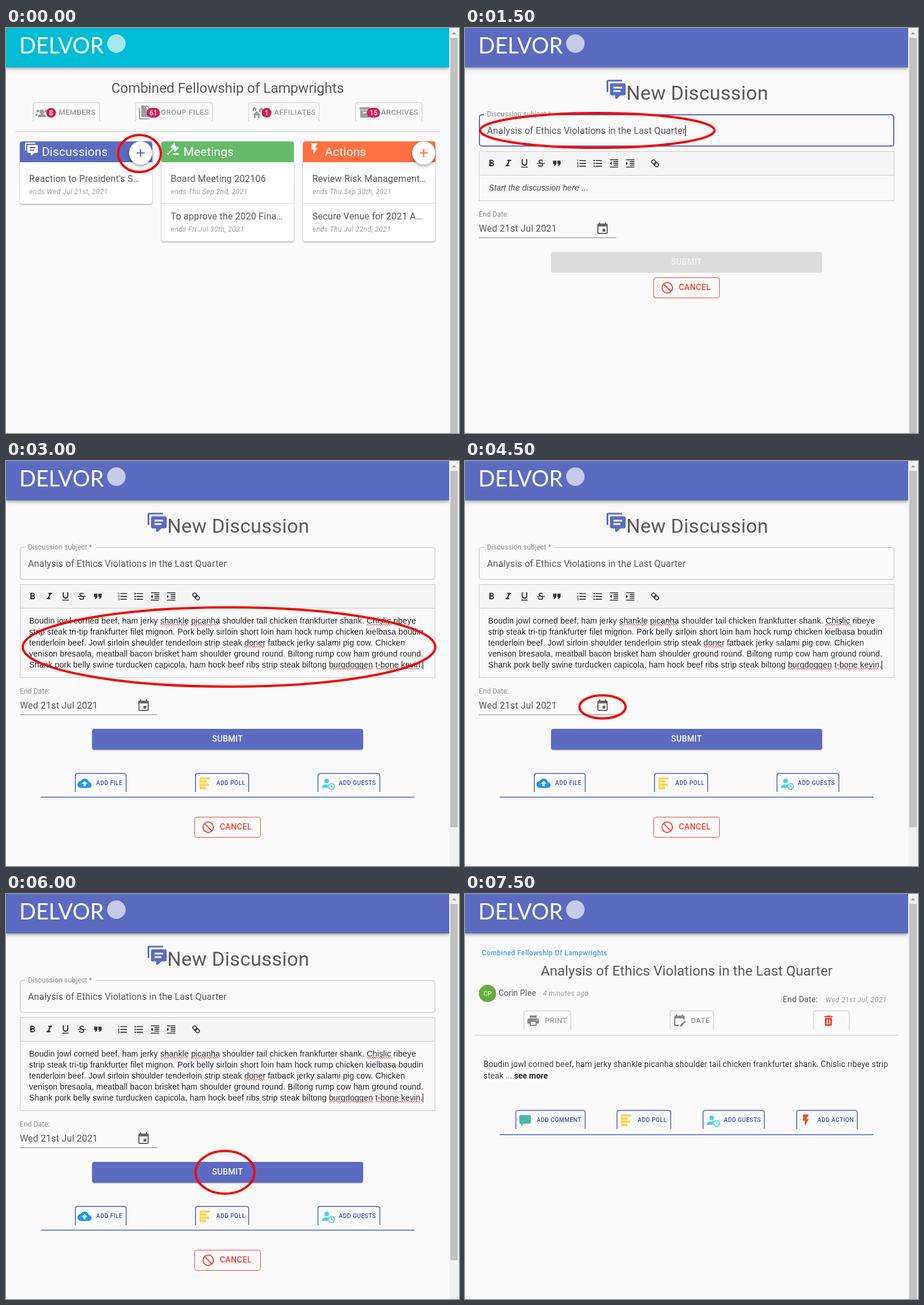
Write an HTML page that moves like this. It is 784 px wide and 700 px high and loops after 8 s.

```html
<!DOCTYPE html>
<html lang="en">
<head>
<meta charset="utf-8">
<title>Starting a discussion</title>
<style>
  html, body { margin: 0; width: 100%; height: 100%; overflow: hidden; background: #fafafa; }
  svg { display: block; width: 784px; height: 700px; font-family: Roboto, sans-serif; }
  .bar { filter: drop-shadow(0 2px 2px #0004) drop-shadow(0 1px 4px #0003); }
  .card { filter: drop-shadow(0 1px 1px #0006); }
  .fab { filter: drop-shadow(0 3px 3px #0005); }
  .button { filter: drop-shadow(0 1px 1px #0005); }
  .body { font-family: "Liberation Sans", Arial, sans-serif; }
  .italic { font-style: italic; }
  .medium { font-weight: 500; }
  .bold { font-weight: 700; }
  .middle { text-anchor: middle; }
</style>
</head>
<body>
<svg id="stage" viewBox="0 0 784 700"></svg>
<script>
const INDIGO = '#5c6bc0', GREEN = '#66bb6a', ORANGE = '#ff7043', RED = '#f44336';
const GREY = '#9e9e9e', PALE = '#e0e0e0', INK = '#5a5a5a', EDGE = '#7986cb', PAGE = '#fafafa';
const SUBJECT = 'Analysis of Ethics Violations in the Last Quarter';

const ICONS = {
  group: 'M8 11a3.300 3.300 0 1 1 8 0a4 4 0 0 1-8 0zM12 15c-4 0-7 1.500-7 3.500V20h14v-1.500c0-2-3-3.500-7-3.500zM2.500 9.500a2.500 2.500 0 1 1 5 0a2.500 2.500 0 0 1-5 0zM16.500 9.500a2.500 2.500 0 1 1 5 0a2.500 2.500 0 0 1-5 0zM6 14c-3 0-5 1-5 3v1h3c0-2 1-3 2-4z',
  files: 'M15 7h5.500L15 1.500zM8 0h8l6 6v12a2 2 0 0 1-2 2H8a2 2 0 0 1-2-2V2a2 2 0 0 1 2-2zM4 4v18h16v2H4a2 2 0 0 1-2-2V4z',
  homes: 'M17 16h-2v6h-3v-5H8v5H5v-6H3l7-6zM6 2l4 4H9v3H7V6H5v3H3V6H2zM18 3l5 5h-1v4h-3V9h-2v3h-1.660L14 10.870V8h-1z',
  archive: 'M3 3h18v4H3zM4 8h16v13H4zM9 11v2h6v-2z',
  chat: 'M12 23a1 1 0 0 1-1-1v-3H7a2 2 0 0 1-2-2V7a2 2 0 0 1 2-2h14a2 2 0 0 1 2 2v10a2 2 0 0 1-2 2h-4.100l-3.700 3.700a1 1 0 0 1-.7.3zM3 15H1V3a2 2 0 0 1 2-2h16v2H3zM9 9v2h10V9zM9 13v2h8v-2z',
  gavel: 'M10.500 9.300L14.700 5 19 9.300l-4.300 4.200zM1.700 20.800L12 10.500l1.500 1.500L3.200 22.300zM7.300 8.500L14 1.800l2 2-6.700 6.700zM13.500 15L20.200 8.300l2 2-6.700 6.700zM12 22v-1a2 2 0 0 1 2-2h6a2 2 0 0 1 2 2v1z',
  flash: 'M7 2v11h3v9l7-12h-4l4-8z',
  plus: 'M19 13h-6v6h-2v-6H5v-2h6V5h2v6h6z',
  bold: 'M7 4h6a4 4 0 0 1 2.600 6.800A4 4 0 0 1 14 18H7zM10 6.500v3h3a1.500 1.500 0 0 0 0-3zM10 12.500v3h3.500a1.500 1.500 0 0 0 0-3z',
  italic: 'M10 4v3h2.200l-3.400 8H6v3h8v-3h-2.200l3.400-8H18V4z',
  underline: 'M12 17a6 6 0 0 0 6-6V3h-2.500v8a3.500 3.500 0 0 1-7 0V3H6v8a6 6 0 0 0 6 6zM5 19v2h14v-2z',
  quote: 'M5 17h3l3-4V6H4v7h3zM14 17h3l3-4V6h-7v7h3z',
  numbers: 'M2 17h2v.5H3v1h1v.5H2v1h3v-4H2zM3 8h1V4H2v1h1zM2 11h1.800L2 13.100v.9h3v-1H3.200L5 10.900V10H2zM7 5v2h14V5zM7 19h14v-2H7zM7 13h14v-2H7z',
  bullets: 'M2.500 4.500h3v3h-3zM2.500 10.500h3v3h-3zM2.500 16.500h3v3h-3zM7 5v2h14V5zM7 19h14v-2H7zM7 13h14v-2H7z',
  outdent: 'M3 12l4 4V8zM3 21h18v-2H3zM3 3v2h18V3zM11 9h10V7H11zM11 13h10v-2H11zM11 17h10v-2H11z',
  indent: 'M3 8v8l4-4zM3 21h18v-2H3zM3 3v2h18V3zM11 9h10V7H11zM11 13h10v-2H11zM11 17h10v-2H11z',
  calendar: 'M19 19H5V8h14zM16 1v2H8V1H6v2H5a2 2 0 0 0-2 2v14a2 2 0 0 0 2 2h14a2 2 0 0 0 2-2V5a2 2 0 0 0-2-2h-1V1zM17 12h-5v5h5z',
  calendarEdit: 'M19 3h-1V1h-2v2H8V1H6v2H5a2 2 0 0 0-2 2v14a2 2 0 0 0 2 2h6v-2H5V8h14v2h2V5a2 2 0 0 0-2-2zM21 12l2 2-7 7.500-3 .5.5-3z',
  cloud: 'M19.350 10A7.500 7.500 0 0 0 5.350 8 6 6 0 0 0 6 20h13a5 5 0 0 0 .35-10zM14 13v4h-4v-4H7l5-5 5 5z',
  poll: 'M3 2h18v3.500H5.500V7H15v4H5.500v1.500H19v4H5.500V18H14v4.500H3z',
  guests: 'M7 8a4 4 0 1 1 8 0a4 4 0 0 1-8 0zM11 14c-5 0-8 1.700-8 4v2h10a7 7 0 0 1 1.500-5.700zM13.500 17.500a6 6 0 1 1 12 0a6 6 0 0 1-12 0zM15.300 17.500a4.200 4.200 0 1 0 8.400 0a4.200 4.200 0 0 0-8.400 0zM18.800 14.500h1.400v3l2.300 1.300-.7 1.200-3-1.800z',
  comment: 'M4 3h16a2 2 0 0 1 2 2v11a2 2 0 0 1-2 2H10l-5 4v-4H4a2 2 0 0 1-2-2V5a2 2 0 0 1 2-2z',
  print: 'M19 8H5a3 3 0 0 0-3 3v6h4v4h12v-4h4v-6a3 3 0 0 0-3-3zM16 19H8v-5h8zM18 11a1 1 0 1 1 2 0a1 1 0 0 1-2 0zM18 3H6v4h12z',
  trash: 'M6 19a2 2 0 0 0 2 2h8a2 2 0 0 0 2-2V7H6zM19 4h-3.500l-1-1h-5l-1 1H5v2h14zM9 10h2v8H9zM13 10h2v8h-2z',
};

const text = (x, y, size, str, fill = INK, cls = '', spacing = 0) =>
  `<text x="${x}" y="${y}" font-size="${size}" fill="${fill}" class="${cls}" letter-spacing="${spacing}">${str}</text>`;
const rect = (x, y, w, h, fill, extra = '') =>
  `<rect x="${x}" y="${y}" width="${w}" height="${h}" fill="${fill}" ${extra}/>`;
const path = (d, stroke, width = 1) => `<path d="${d}" fill="none" stroke="${stroke}" stroke-width="${width}"/>`;
const circle = (x, y, r, fill, extra = '') => `<circle cx="${x}" cy="${y}" r="${r}" fill="${fill}" ${extra}/>`;
const icon = (name, x, y, fill, scale = 1) =>
  `<path transform="translate(${x} ${y}) scale(${scale})" d="${ICONS[name]}" fill="${fill}" fill-rule="evenodd"/>`;
const ring = (x, y, rx, ry) =>
  `<ellipse cx="${x}" cy="${y}" rx="${rx}" ry="${ry}" fill="none" stroke="#f20505" stroke-width="4"/>`;
const rule = (x1, x2, y, color) => path(`M${x1} ${y}H${x2}`, color, 2);

// Box open at the bottom, like a folder tab
const tab = (x1, x2, y, color) =>
  path(`M${x1 + 1} ${y + 33}V${y + 5}q0-4 4-4H${x2 - 5}q4 0 4 4V${y + 33}`, color, 2);
const greyTab = (x1, x2, y, label, textX) =>
  tab(x1, x2, y, PALE) + text(textX, y + 22, 13, label, GREY, 'medium', .37);
const actionTab = (x1, x2, y, label, name, color) =>
  tab(x1, x2, y, EDGE) + icon(name, x1 + 5, y + 6, color) +
  text(x1 + 37, y + 21, 10, label, '#3f51b5', 'medium', .5);

function badge(x, label) {
  const width = label.length > 1 ? 23 : 17;
  return rect(x - width / 2, 138, width, 17, '#d81b60', 'rx="8.5"') +
    text(x, 151, 12, label, '#fff', 'middle medium');
}

const header = color =>
  rect(0, 0, 767, 68, color, 'class="bar"') +
  text(23, 44, 38, 'DELVOR', '#fff', '" style="font-family:Lato,sans-serif') +
  circle(191, 27, 16, '#fff', 'opacity=".65"');

const scrollbar = thumbEnd =>
  rect(767, 0, 17, 700, '#f1f1f1') + rect(769, 17, 13, thumbEnd - 17, '#c1c1c1') +
  '<path d="M771.500 11l4-4 4 4z" fill="#a3a3a3"/>';

function card(x, color, name, title, items) {
  const bottom = 239 + items.length * 65;
  return rect(x, 196, 229, bottom - 196, '#fff', 'rx="4" class="card"') +
    `<path d="M${x} 232v-32q0-4 4-4h221q4 0 4 4v32z" fill="${color}"/>` +
    icon(name, x + 8, 197, '#fff') + text(x + 38, 221, 20.8, title, '#fff', '', .15) +
    items.map(([subject, ends], i) =>
      (i ? rect(x, 303, 229, 1, PALE) : '') +
      text(x + 16, 266 + 65 * i, 16, subject, INK, '', .15) +
      text(x + 16.500, 287 + 65 * i, 12, 'ends ' + ends, GREY, 'italic', .4)).join('');
}

const addButton = (x, color) => circle(x, 216, 20, '#fff', 'class="fab"') + icon('plus', x - 12, 204, color);

const home = () =>
  header('#00bcd4') +
  text(383.5, 112, 24, 'Combined Fellowship of Lampwrights', INK, 'middle') +
  greyTab(46, 163, 128, 'MEMBERS', 91) + icon('group', 50, 134, GREY) + badge(78, '8') +
  greyTab(223, 358, 128, 'GROUP FILES', 268) + icon('files', 228, 134, GREY) + badge(255, '61') +
  greyTab(419, 543, 128, 'AFFILIATES', 464) + icon('homes', 424, 134, GREY) + badge(451, '1') +
  greyTab(604, 721, 128, 'ARCHIVES', 649) + icon('archive', 609, 134, GREY) + badge(636, '15') +
  rule(16, 751, 179, PALE) +
  card(24, INDIGO, 'chat', 'Discussions', [['Reaction to President\'s S…', 'Wed Jul 21st, 2021']]) +
  card(269, GREEN, 'gavel', 'Meetings',
    [['Board Meeting 202106', 'Thu Sep 2nd, 2021'], ['To approve the 2020 Fina…', 'Fri Jul 30th, 2021']]) +
  card(514, ORANGE, 'flash', 'Actions',
    [['Review Risk Management…', 'Thu Sep 30th, 2021'], ['Secure Venue for 2021 A…', 'Thu Jul 22nd, 2021']]) +
  addButton(233, INDIGO) + addButton(723, ORANGE) +
  ring(231, 217, 37, 32) + scrollbar(700);

function toolbar() {
  const tools = { bold: 46, italic: 75, underline: 103, quote: 159, numbers: 202, bullets: 230, outdent: 258, indent: 286 };
  const link = x => `<rect x="${x}" y="-3" width="8" height="6" rx="3" fill="none" stroke="#333" stroke-width="1.600"/>`;
  return rect(24.5, 213.5, 718, 41, '#f5f5f5', 'stroke="#ccc"') +
    Object.entries(tools).map(([name, x]) => icon(name, x - 9.600, 224.5, '#333', .8)).join('') +
    path('M134.500 230.500c-1-3-7-2.500-6.500.5c.5 2 6.500 2.500 6.500 5.500c0 3.500-6.500 3.500-7.500 0', '#333', 1.7) +
    path('M124.500 234H138', '#333', 1.4) +
    `<g transform="translate(329 234) rotate(45)">${link(-7)}${link(-1)}</g>`;
}

const LINES = [
  ['Boudin jowl corned beef, ham jerky shankle picanha shoulder tail chicken frankfurter shank. Chislic ribeye', 710],
  ['strip steak tri-tip frankfurter filet mignon. Pork belly sirloin short loin ham hock rump chicken kielbasa boudin', 722],
  ['tenderloin beef. Jowl sirloin shoulder tenderloin strip steak doner fatback jerky salami pig cow. Chicken', 691],
  ['venison bresaola, meatball bacon brisket ham shoulder ground round. Biltong rump cow ham ground round.', 721],
  ['Shank pork belly swine turducken capicola, ham hock beef ribs strip steak biltong burgdoggen t-bone kevin.', 721],
];

const squiggle = (x1, x2, y) =>
  path(`M${x1} ${y}` + 'l2-2l2 2'.repeat((x2 - x1) / 4), '#e53935');

const message = () =>
  LINES.map(([line, end], i) =>
    rect(40, 268 + 19 * i, end - 40, 16, '#fff') + text(40, 281 + 19 * i, 14, line, '#222', 'body', .15)).join('') +
  squiggle(267, 316, 284) + squiggle(320, 370, 284) + squiggle(624, 668, 284) +
  squiggle(412, 449, 322) + squiggle(559, 636, 360) + squiggle(640, 718, 360) +
  rect(721, 345, 1, 15, '#000');

// The form grows by 76px once the message is filled in.
function form(filled) {
  const dy = filled ? 76 : 0, cancelY = filled ? 615 : 431;
  const field = filled
    ? rect(24.5, 149.5, 718, 55, 'none', 'rx="4" stroke="#c0c0c0"')
    : rect(25, 150, 717, 54, 'none', `rx="4" stroke="${INDIGO}" stroke-width="2"`) + rect(381, 168, 1, 19, '#000');
  return header(INDIGO) +
    icon('chat', 243.5, 88, INDIGO, 1.5) + text(279, 124, 34, 'New Discussion', INK, '', .25) +
    field + rect(33, 148, 122, 4, PAGE) +
    text(38, 153, 12, 'Discussion subject *', '#8e8e8e', '', .11) + text(38, 183, 16, SUBJECT, INK, '', .15) +
    toolbar() + rect(24.5, 254.5, 718, 44 + dy, 'none', 'stroke="#ccc"') +
    (filled ? message() : text(41, 281, 14, 'Start the discussion here ...', '#444', 'body italic', .1)) +
    text(24, 326 + dy, 12, 'End Date:', '#8e8e8e', '', .11) +
    text(24, 352 + dy, 16, 'Wed 21st Jul 2021', INK, '', .15) +
    icon('calendar', 226, 335 + dy, '#666') + rect(24, 362 + dy, 238, 1, '#8c8c8c') +
    rect(149, 387 + dy, 469, 36, filled ? INDIGO : '#dcdcdc', `rx="4" class="${filled ? 'button' : ''}"`) +
    text(383.5, 409 + dy, 14, 'SUBMIT', filled ? '#fff' : '#f6f6f6', 'middle medium', .4) +
    (filled
      ? actionTab(119, 209, 539, 'ADD FILE', 'cloud', '#2196f3') +
        actionTab(327, 421, 539, 'ADD POLL', 'poll', '#ffd54f') +
        actionTab(539, 648, 539, 'ADD GUESTS', 'guests', '#4dd0e1') + rule(60, 707, 581, EDGE)
      : '') +
    rect(326.5, cancelY + .5, 114, 35, 'none', `rx="4" stroke="${RED}"`) +
    circle(350, cancelY + 18, 9, 'none', `stroke="${RED}" stroke-width="2"`) +
    path(`M343.600 ${cancelY + 11.6}l12.800 12.800`, RED, 2) +
    text(370, cancelY + 22, 14, 'CANCEL', RED, 'medium', .4) +
    scrollbar(filled ? 633 : 700);
}

const posted = () =>
  header(INDIGO) +
  text(29, 106, 12, 'Combined Fellowship Of Lampwrights', '#4f9fe0', 'medium', .4) +
  text(383.5, 141, 24, SUBJECT, INK, 'middle') +
  circle(39, 172, 15, '#67ad3f') + text(39, 176, 11, 'CP', '#fff', 'middle') +
  text(58, 176, 14, 'Corin Plee', INK, '', .15) + text(135, 176, 12, '4 minutes ago', GREY, 'italic', .4) +
  text(550, 187, 14, 'End Date:', INK, '', .15) + text(624, 187, 12, 'Wed 21st Jul, 2021', GREY, 'italic', .4) +
  greyTab(101, 184, 201, 'PRINT', 138) + icon('print', 106, 207, '#8a8a8a') +
  greyTab(354, 431, 201, 'DATE', 391) + icon('calendarEdit', 359, 207, '#8a8a8a') +
  tab(602, 666, 201, PALE) + icon('trash', 617, 207, RED) +
  rule(16, 751, 244, PALE) +
  rect(32, 286, 700, 17, '#fff') + rect(32, 306, 113, 17, '#fff') +
  text(32, 299, 14, LINES[0][0] + ' strip', '#3c3c3c', '', .15) + text(32, 319, 14, 'steak ...', '#3c3c3c', '', .15) +
  text(85, 319, 14, 'see more', '#222', 'bold') +
  actionTab(87, 209, 373, 'ADD COMMENT', 'comment', '#4db6ac') +
  actionTab(262, 357, 373, 'ADD POLL', 'poll', '#ffd54f') +
  actionTab(411, 519, 373, 'ADD GUESTS', 'guests', '#4dd0e1') +
  actionTab(573, 680, 373, 'ADD ACTION', 'flash', '#f4511e') +
  rule(60, 707, 416, EDGE) + scrollbar(700);

const SCENES = [
  home,
  () => form(false) + ring(229, 177, 203, 30),
  () => form(true) + ring(386, 321.5, 357, 68.5),
  () => form(true) + ring(238, 425, 40, 20),
  () => form(true) + ring(379, 481, 51, 37),
  posted,
];
const LOOP = 8000, HOLD = 1500;
const stage = document.getElementById('stage');
let shown = -1;

function draw() {
  const scene = Math.floor(performance.now() % LOOP / HOLD);
  if (scene !== shown) stage.innerHTML = SCENES[shown = scene]();
  requestAnimationFrame(draw);
}
draw();
</script>
</body>
</html>
```
